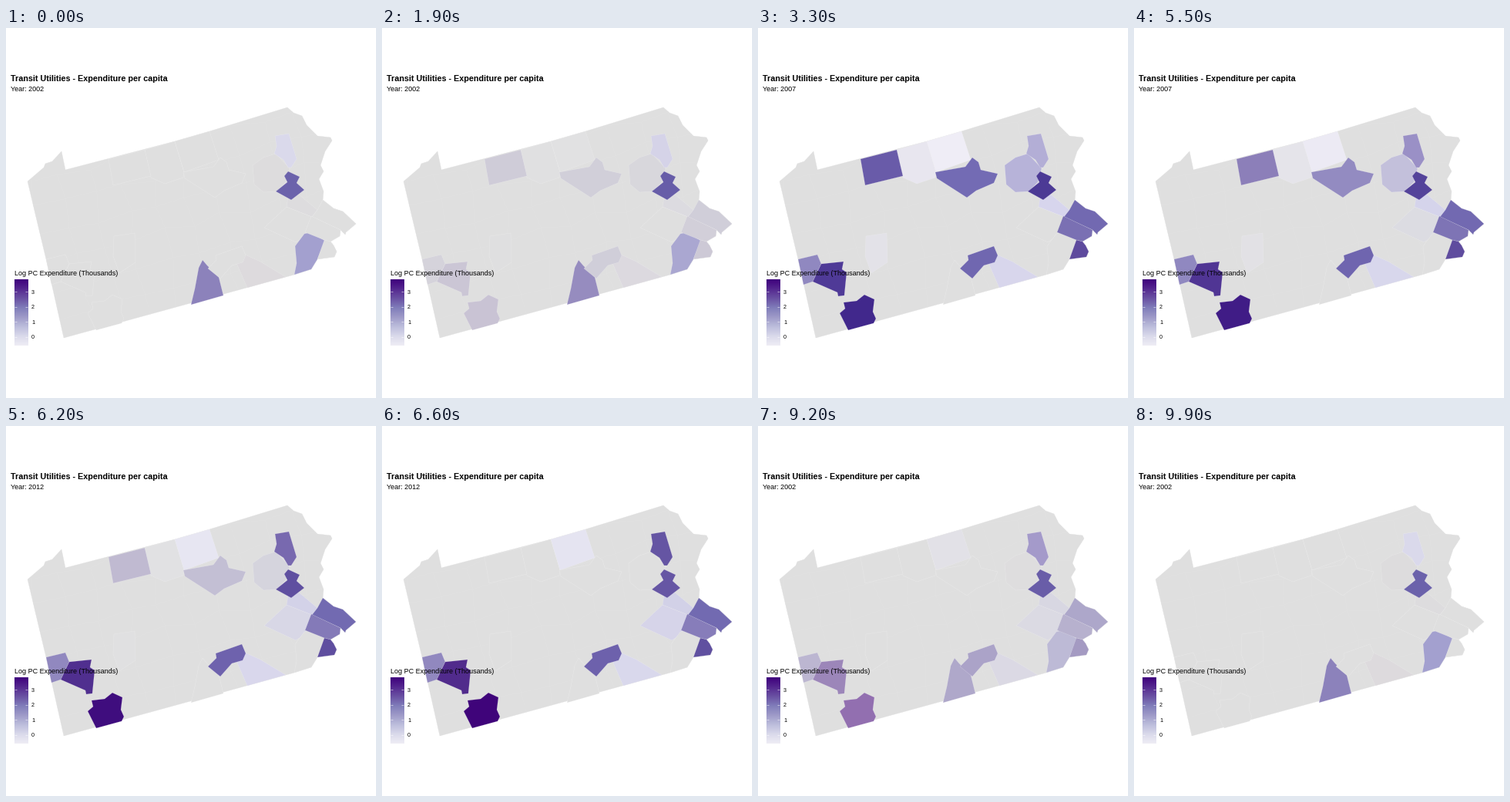
These frames come from a looping animation (480 by 480 pixels, 10000 ms). A matplotlib script:

```python
import numpy as np
import matplotlib.pyplot as plt
from matplotlib.animation import FuncAnimation
from matplotlib.colors import LinearSegmentedColormap, to_rgb
from matplotlib.patches import Polygon

SIZE, DPI, STEP = 480, 72, 100
GRAY = "#dfdfdf"
plt.rcParams["font.family"] = "Liberation Sans"

fig = plt.figure(figsize=(SIZE / DPI, SIZE / DPI), dpi=DPI, facecolor="white")
ax = fig.add_axes([0, 0, 1, 1])
ax.axis("off")

# state outline, in pieces shared with the counties along it
lake = [(28, 199), (49, 181), (51, 176), (60, 173), (72, 160), (77, 184)]
top = [(219, 147), (264, 134)]
river = [(365, 103), (373, 110), (384, 114), (390, 126), (404, 140), (421, 142), (423, 146),
         (414, 160), (408, 178), (412, 186), (406, 196), (412, 212)]
bend = [(411, 223), (425, 234), (437, 238), (454, 254), (441, 265), (440, 268), (434, 262)]
tidal = [(433, 270), (421, 277)]
delta = [(425, 282), (429, 290), (426, 297), (404, 300)]
south = [(396, 313), (374, 320)]
west = [(75, 402), (52, 300)]
state = Polygon(lake + top + river + bend + tidal + delta + south + west,
                fc=GRAY, ec=GRAY, lw=.3, zorder=0)
ax.add_patch(state)

# faint borders: a slanted grid of counties, slightly shaken
rng = np.random.default_rng(4)
col, row = np.meshgrid(np.arange(12), np.arange(8))
gx = 28 + 38 * col + 8 * row + rng.uniform(-6, 6, col.shape)
gy = 199 - 10 * col + 35 * row + rng.uniform(-6, 6, col.shape)
for line in ax.plot(gx, gy, color="#e2e2e2", lw=.6, zorder=.5) + \
        ax.plot(gx.T, gy.T, color="#e2e2e2", lw=.6, zorder=.5):
    line.set_clip_path(state)

counties = []


def county(points, *colors):
    """Add a county with its fill in 2002, 2007 and 2012."""
    patch = ax.add_patch(Polygon(points, ec=(1, 1, 1, .3), lw=.5))
    counties.append((patch, [np.array(to_rgb(c)) for c in colors]))


# later counties cover the edges of earlier ones
county([(180, 158), top[0], (231, 187), (230, 194), (206, 202), (188, 194)], GRAY, "#e8e6ef", GRAY)
county([*top, (276, 171), (231, 187)], GRAY, "#efedf6", "#e5e4f1")
county([(133, 170), (180, 158), (188, 192), (139, 204)], GRAY, "#695ba9", GRAY)
county([(230, 187), (269, 180), (278, 168), (286, 174), (289, 184), (311, 189), (306, 201),
        (283, 211), (271, 220), (232, 195)], GRAY, "#736bb4", GRAY)
county([(320, 178), (334, 168), (350, 163), (368, 182), (363, 200), (351, 212), (334, 213),
        (322, 203)], "#dddcdd", "#b7b3d9", GRAY)
county([(349, 140), (367, 137), (377, 170), (370, 181), (366, 181), (360, 171), (348, 163),
        (351, 153)], "#dad9eb", "#b3aed6", "#6555a3")
county([(335, 259), (364, 232), (397, 245), (388, 270), (376, 278)], GRAY, GRAY, "#d6d4e9")
county([(366, 219), (380, 216), (404, 236), (397, 245), (364, 232)],
       "#dddcde", "#d7d5ed", "#d2d1e7")
county([(366, 186), (381, 193), (377, 201), (387, 210), (370, 223), (350, 212), (365, 200),
        (361, 192)], "#6b62ab", "#4c3a95", "#6656a4")
county(bend + [(397, 245), (404, 236)], GRAY, "#7269b1", "#726ab1")
county([(387, 267), (395, 265), (414, 276), delta[-1], *south, (377, 305), (375, 283)],
       "#a3a0cf", GRAY, GRAY)
county([(388, 265), (396, 244), bend[-1], *tidal, (413, 275)], GRAY, "#7a70b3", "#877dba")
county(delta + [(413, 275), tidal[-1]], GRAY, "#5e4a9d", "#6050a0")
county([(310, 294), (330, 303), (363, 323), (313, 337), (299, 305)],
       "#dddadd", "#d8d6ec", "#d9d8ec")
county([(240, 359), (245, 338), (250, 311), (255, 301), (261, 308), (276, 323), (282, 347)],
       "#8c82bb", GRAY, GRAY)
county([(262, 312), (273, 301), (272, 295), (306, 283), (311, 295), (307, 304), (293, 308),
        (278, 325)], GRAY, "#7067b0", "#6d61ac")
county([west[-1], (77, 294), (82, 306), (71, 329), (59, 333)], GRAY, "#9088c0", "#9188bf")
county([(82, 306), (111, 303), (109, 313), (115, 317), (112, 347), (104, 348), (103, 343),
        (71, 329)], GRAY, "#4f3a97", "#512b8c")
county([(106, 370), (113, 364), (111, 356), (128, 354), (138, 346), (151, 352), (149, 368),
        (153, 377), (150, 383), (117, 392)], GRAY, "#41288c", "#3f047a")
county([(140, 270), (167, 266), (168, 304), (147, 318), (139, 296)], GRAY, "#e3e2e8", GRAY)

# titles and legend
ax.text(6.5, 69, "Transit Utilities - Expenditure per capita", size=10.8, weight="bold")
year = ax.text(6.5, 82, "", size=9)
ax.text(11, 321, "Log PC Expenditure (Thousands)", size=9)
purples = LinearSegmentedColormap.from_list("purples", [
    "#3f007d", "#54278f", "#6a51a3", "#807dba", "#9e9ac8", "#bcbddc", "#dadaeb", "#efedf5"])
ax.imshow(np.linspace(0, 1, 256)[:, None], cmap=purples, extent=(11, 28.3, 412, 326),
          aspect="auto", zorder=3, interpolation="nearest")
for value in range(4):
    y = 400.5 - 19.5 * value
    ax.text(33, y + 2.6, str(value), size=7.2)
    for x in (11, 24.9):
        ax.plot([x, x + 3.4], [y, y], color="white", lw=.5, zorder=4, solid_capstyle="butt")
ax.set(xlim=(0, SIZE), ylim=(SIZE, 0))

# moments at which the fills move on, and the start of each transition
SPAN = 1600
moves = [
    ([*range(1700, 2600, 200), *range(2600, 3300, 200), 3300], 1700),
    ([5000, 5300, 5500, 5800, 5900, 6200, 6500, 6600], 5000),
    ([*range(8400, 9900, 200), 9900], 8300),
]


def phase(now):
    """Index of the state being left and the share of the way to the next one."""
    index, share = 0, 0
    for i, (times, start) in enumerate(moves):
        past = [t for t in times if t <= now]
        if past:
            index, share = i, (past[-1] - start) / SPAN
    return index, share


def blend(a, b, share):
    """Mix two fills, leaning to purple halfway as a perceptual mix does."""
    dip = share * (1 - share) * (a[1] - b[1]) ** 2
    return np.clip(a + (b - a) * share - dip * np.array([.15, .34, .06]), 0, 1)


def draw(frame):
    index, share = phase(frame * STEP)
    after = (index + 1) % 3
    for patch, fills in counties:
        patch.set_facecolor(blend(fills[index], fills[after], share))
    year.set_text(f"Year: {2002 + 5 * (after if share > .5 else index)}")
    return [year] + [patch for patch, _ in counties]


anim = FuncAnimation(fig, draw, frames=100, interval=STEP, repeat=True, repeat_delay=0)
plt.show()
```
